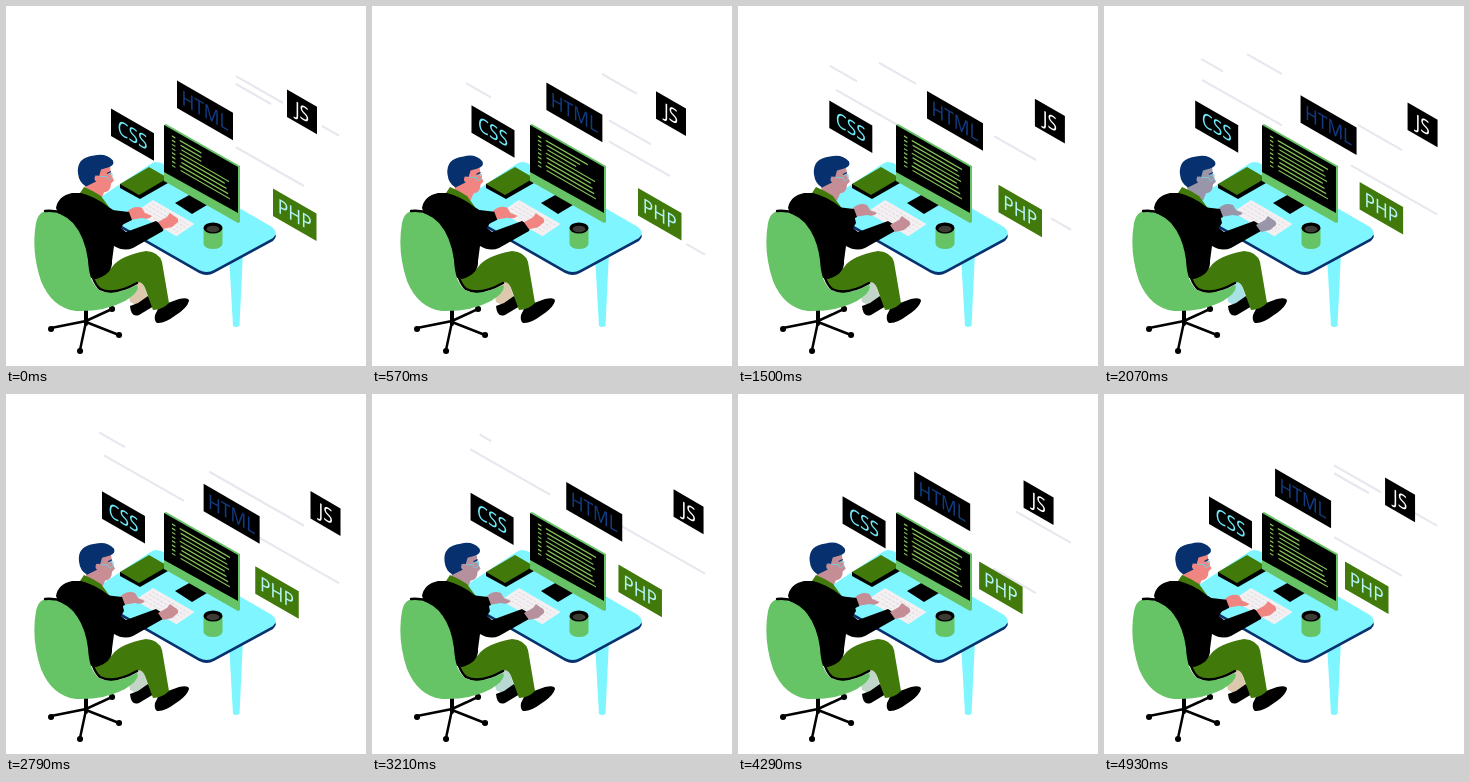
An HTML page that plays this animation: 360 px wide and 360 px high, repeating every 5 s.

```html
<!DOCTYPE html>
<html lang="en">
<head>
<meta charset="utf-8">
<title>Developer at a desk</title>
<style>
  html, body { margin: 0; width: 100%; height: 100%; overflow: hidden; background: #fff; }
  svg { display: block; width: 100vw; height: 100vh; --skin: #f08581; --sock: #dcc8ac; }
  text { font: 20px "Noto Sans", sans-serif; text-anchor: middle; }
  .skin { fill: var(--skin); }
  .navy { fill: #07306f; }
  .green { fill: #66c466; }
  .olive { fill: #417a0a; }
  .desk { fill: #7ff6ff; }
  .line { fill: none; stroke: #000; stroke-linecap: round; }
</style>
</head>
<body>
<svg viewBox="0 0 360 360">
  <defs>
    <path id="top" d="M150 156Q155 156 159 159L266 221Q273 227 267 232L208 264Q201 268 193 264L90 205Q84 200 90 194L143 159Q147 156 150 156Z"/>
  </defs>
  <g id="streaks" stroke="#e6e7ef" stroke-width="2.1"></g>
  <g id="tags"></g>

  <g id="table">
    <path class="desk" d="M223 250L237 246L233.500 320Q230 322 227 320Z"/>
    <use href="#top" class="navy" y="3"/>
    <use href="#top" class="desk"/>
    <path d="M114 178V182L134 193L162 177V172Z"/>
    <path class="olive" d="M114 178L143 161L162 172L133 189Z"/>
    <path d="M169 197L185 188L201 199L186 208Z"/>
  </g>

  <g id="monitor">
    <path class="green" d="M158 119L160 118L234 160V216L232 217L158 175Z"/>
    <path d="M158 119L232 161V207L158 166Z"/>
    <g id="code" transform="matrix(.866 .5 0 1 159 119)" stroke="#86c457" stroke-width="1.4"></g>
  </g>

  <g id="mug">
    <path class="green" d="M197.500 222V238Q199 243 207 243Q215 243 216.500 238V222Z"/>
    <ellipse cx="207" cy="222" rx="9.500" ry="5.500"/>
    <ellipse cx="207" cy="223" rx="6.500" ry="3.200" fill="#3c3c34"/>
  </g>

  <g id="keyboard" transform="matrix(.866 .5 -.866 .58 147 194)">
    <path d="M0 0H48V21H0Z" fill="#f4f0f2"/>
    <path d="M3 4H45M3 8H45M3 12H45M3 16H45" stroke="#dddbe2" stroke-width="1" stroke-dasharray="3 1.500"/>
  </g>

  <g id="chair-base" class="line" stroke-width="2.500">
    <path d="M80 303V318" stroke-width="4"/>
    <path d="M45 322L80 315L106 303M74 344L80 316L113 329"/>
    <path d="M45 323h.1M74 345h.1M113 329h.1M106 303h.1" stroke-width="6"/>
  </g>

  <g id="legs">
    <path d="M121 279L136 274L142 292L132 300L124 296Z" fill="var(--sock)"/>
    <path d="M124 300L132 297L142 290L148 300L133 309Q125 312 124 300Z"/>
    <path d="M149 309L152 303L162 297L173 293Q183 291 183 295Q181 302 170 309Q158 318 151 317Q148 315 149 309Z"/>
    <path class="olive" d="M86 272Q100 270 107 260Q114 250 140 245Q153 246 156 256L163 297Q156 304 147 304L139 282Q136 274 130 277L110 287Q94 289 86 272Z"/>
  </g>

  <g id="head">
    <path class="skin" d="M84 163L104 160L105 169L108 175L105 178Q105 186 98 187L95 194L82 191L79 181Z"/>
    <path class="navy" d="M72 168Q70 152 88 150Q100 147 107 155Q109 160 102 162L95 164L93 171L89 170L90 176L80 181Q73 177 72 168Z"/>
    <circle class="skin" cx="91.500" cy="173" r="3"/>
    <path class="line" d="M94 171L101 171Q101 175 104 174Q107 172 106 168L102 169" style="stroke:#79c9d8" stroke-width="1"/>
    <path d="M101 168L105 166" stroke="#07306f" stroke-width="1.200"/>
  </g>
  <path class="olive" d="M72 190L78 181Q88 185 95 190L103 201L92 205Z"/>
  <g class="hand">
    <path class="skin" d="M121 206Q128 199 136 202L139 207L146 210Q143 214 136 212L124 214Z"/>
    <path d="M106 204L123 206L126 214L112 221Z"/>
  </g>
  <path d="M50 202Q52 190 66 187L75 187Q90 191 101 200L112 207L116 208L118 217L115 222L120 226L150 215L158 220L157 225L127 242Q118 246 108 240L106 255Q107 268 90 273L78 270Z"/>
  <g class="hand"><path class="skin" d="M152 216L161 211L164 207L168 210Q173 212 172 216L166 221L157 223Z"/></g>

  <g id="chair">
    <path class="green" d="M37 206Q53 203 67 217Q79 231 82 254Q83 276 93 284Q107 291 131 279Q135 285 119 295Q98 306 70 305Q46 302 35 275Q25 245 30 217Q32 208 37 206Z"/>
    <path class="line" d="M39 205Q57 203 70 217Q82 232 84 254Q85 275 94 283Q108 290 131 277" stroke-width="2.400"/>
  </g>
</svg>

<script>
const LOOP = 5000, STEP = LOOP / 70, SLOPE = .57;
const $ = selector => document.querySelector(selector);

function add(parent, name, attrs) {
  const node = document.createElementNS("http://www.w3.org/2000/svg", name);
  for (const key in attrs) node.setAttribute(key, attrs[key]);
  return parent.appendChild(node);
}

// Linear interpolation over [time, value, time, value, ...]
function track(t, keys) {
  if (t <= keys[0]) return keys[1];
  for (let i = 2; i < keys.length; i += 2) {
    if (t <= keys[i]) {
      const k = (t - keys[i - 2]) / (keys[i] - keys[i - 2]);
      return keys[i - 1] + (keys[i + 1] - keys[i - 1]) * k;
    }
  }
  return keys[keys.length - 1];
}

const ease = k => (1 - Math.cos(Math.PI * Math.min(k, 1))) / 2;
const sway = t => ease(t < LOOP / 2 ? t / 2500 : (LOOP - t) / 2500);
const cssKeys = [0, 0, 570, -5.5, 1250, -12.5, 1500, -13.7, 1785, -14, 2070, -13.8, 2790, -9, 3640, -2.8, 4400, 0];

// Each tag slides along the isometric axis
const tags = [
  { label: "CSS", x: 105, y: 102.5, w: 43, fill: "#000", ink: "#6fe8f8", shift: t => track(t, cssKeys) },
  { label: "HTML", x: 171, y: 74.5, w: 56, fill: "#000", ink: "#123a80", shift: t => 27.5 * sway(t) },
  { label: "JS", x: 281, y: 83.5, w: 30, fill: "#000", ink: "#fff", shift: t => 24.3 * sway(t) },
  { label: "PHP", x: 267, y: 182.5, w: 43.5, fill: "#417a0a", ink: "#b4f4f8", shift: t => -26 * ease(t / 4500) }
];
for (const tag of tags) {
  const width = tag.w / .866;
  tag.node = add($("#tags"), "g", {});
  add(tag.node, "rect", { width, height: 27.5, fill: tag.fill });
  add(tag.node, "text", { x: width / 2, y: 21, fill: tag.ink }).textContent = tag.label;
}

// Rising streaks: right end, its height over time, left end over time
const streaks = [
  { right: 277, y: [4600, 104, 5170, 94], left: [0, 230] },
  { right: 265, y: [4600, 105, 6250, 76], left: [0, 230] },
  { right: 298, y: [3500, 220, 5000, 180, 8000, 128], left: [3500, 293, 4800, 230, 5000, 230, 5570, 237, 6500, 256, 7070, 254, 7790, 203] },
  { right: 333, y: [300, 256, 5250, 123], left: [300, 320, 570, 314, 1500, 313, 2070, 247, 3640, 245, 4930, 311, 5250, 333] },
  { right: 178, y: [1200, 83, 2600, 59], left: [1200, 160, 1500, 141, 2070, 143, 2600, 165] },
  { right: 119, y: [300, 96, 3200, 46], left: [300, 105, 570, 94, 1500, 92, 2070, 97, 2790, 93, 3200, 110] },
  { right: 178, y: [900, 140, 4150, 83], left: [0, 98] },
  { right: 279, y: [300, 143, 1000, 131], left: [0, 237] }
];
for (const streak of streaks) streak.node = add($("#streaks"), "path", {});

const rows = Array.from({ length: 8 }, (_, i) => {
  const y = 7 + 4.2 * i;
  add($("#code"), "path", { d: `M8 ${y}h4` });
  return { y, start: 17 + i % 3, node: add($("#code"), "path", {}) };
});

function drawStreak(streak, time) {
  const begin = streak.y[0], end = streak.y[streak.y.length - 2];
  const t = time < begin ? time + LOOP : time;
  const left = track(t, streak.left), y = track(t, streak.y);
  streak.node.setAttribute("d", t > end ? "" :
    `M${left} ${y - (streak.right - left) * SLOPE}L${streak.right} ${y}`);
}

function draw(now) {
  const t = Math.floor((now % LOOP + 2) / STEP) % 70 * STEP;

  for (const tag of tags) {
    const dx = tag.shift(t);
    tag.node.setAttribute("transform", `matrix(.866 .5 0 1 ${tag.x + dx} ${tag.y + dx * .577})`);
  }
  for (const streak of streaks) drawStreak(streak, t);

  rows.forEach((row, i) => {
    const full = 75 - i * 5 % 7;
    const typed = track(t, [i * 150, 0, i * 150 + 800, 1, 4300, 1, 4700, 0]);
    const end = i < 3 ? 42 + (full - 42) * typed : full;
    row.node.setAttribute("d", `M${row.start} ${row.y}H${end}`);
  });

  const lean = track(t, [0, 0, 570, 3.5, 1500, 4, 2070, 4, 2790, 1, 3640, 0, 4930, -.5]);
  $("#head").setAttribute("transform", `translate(${lean} ${lean / 4 - .5})`);

  // The left hand draws back while the right one reaches down the keys
  const reach = track(t, [0, 0, 570, .1, 1300, 1, 3900, 1, 4930, .1]);
  const [leftHand, rightHand] = document.querySelectorAll(".hand");
  leftHand.setAttribute("transform", `translate(${-7 * reach} ${-3 * reach})`);
  rightHand.setAttribute("transform", `translate(0 ${3 * reach})`);

  const cool = track(t, [0, 0, 570, 0, 1500, 50, 2070, 100, 2790, 45, 3640, 100, 4930, 0]);
  const style = $("svg").style;
  style.setProperty("--skin", `color-mix(in srgb, #9a96aa ${cool}%, #f08581)`);
  style.setProperty("--sock", `color-mix(in srgb, #a8e2e6 ${cool}%, #dcc8ac)`);
}

const origin = performance.now();
function tick() {
  draw(performance.now() - origin);
  requestAnimationFrame(tick);
}
tick();
</script>
</body>
</html>
```
